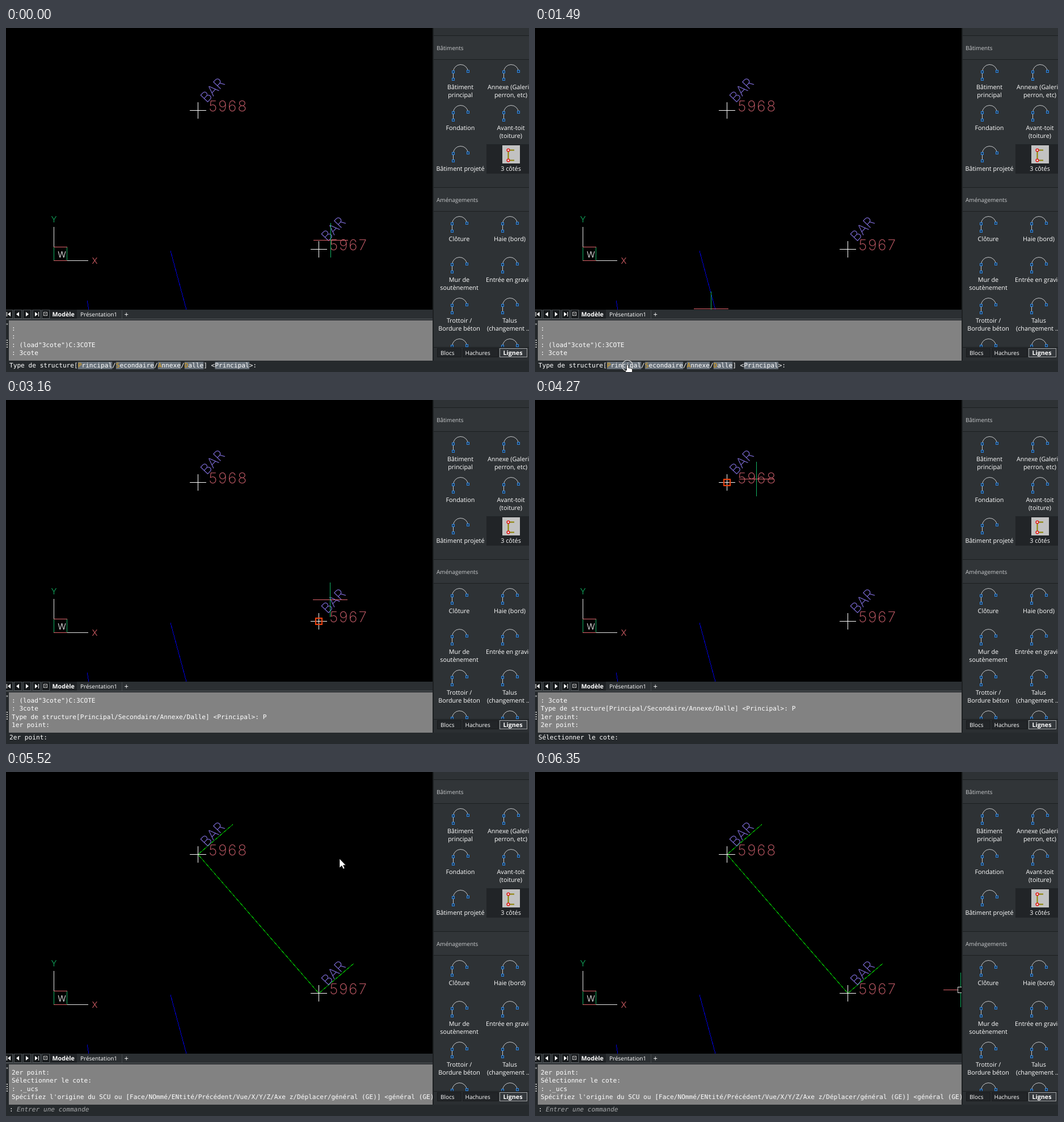
An HTML page for the animation above (6.87 s loop, 922x607 px).

```html
<!DOCTYPE html>
<html lang="fr">
<head>
<meta charset="utf-8">
<title>3 côtés</title>
<style>
html, body { margin: 0; width: 100%; height: 100%; overflow: hidden; background: #000; }
svg { display: block; width: 922px; height: 607px; }
text { white-space: pre; text-rendering: geometricPrecision; }
.mono { font: 11.15px "DejaVu Sans Mono", monospace; fill: #fff; }
.ui { font: 10px "Open Sans", "Noto Sans", sans-serif; fill: #fff; }
.label { font-size: 10.8px; text-anchor: middle; }
.left { text-anchor: start; }
.bold { font-weight: 700; font-size: 10.7px; }
.head { fill: #c8cacc; }
.plus { font-size: 13px; }
.tiny { font-size: 7px; }
.cad { font-family: Inter, Lato, sans-serif; font-weight: 200; }
.axis { font-weight: 300; font-size: 15px; text-anchor: middle; }
.crisp { shape-rendering: crispEdges; }
</style>
</head>
<body>
<svg id="stage" viewBox="0 0 922 607" xmlns="http://www.w3.org/2000/svg"></svg>
<script>
const LOOP = 6870;
const RED = '#e0646c', GREEN = '#12b464';
const CHAR = 6.713;

const rect = (x, y, w, h, fill, extra = '') =>
  `<rect x="${x}" y="${y}" width="${w}" height="${h}" fill="${fill}" ${extra}/>`;
const line = (x1, y1, x2, y2, stroke, extra = '') =>
  `<line x1="${x1}" y1="${y1}" x2="${x2}" y2="${y2}" stroke="${stroke}" ${extra}/>`;
const path = (d, fill, extra = '') => `<path d="${d}" fill="${fill}" ${extra}/>`;
const escape = s => s.replace(/&/g, '&amp;').replace(/</g, '&lt;');
const text = (x, y, s, cls, extra = '') =>
  `<text x="${x}" y="${y}" class="${cls}" ${extra}>${escape(s)}</text>`;

// ---- drawing area ----
function surveyPoint(x, y, id) {
  return line(x - 14, y + .5, x + 15, y + .5, '#fff', 'class="crisp"') +
    line(x + .5, y - 14, x + .5, y + 15, '#fff', 'class="crisp"') +
    text(x + 19.5, y + 1.5, id, 'cad', 'font-size="26" letter-spacing="2" fill="#c45c68"') +
    `<g transform="translate(${x + 26} ${y - 35.5}) rotate(-46)">` +
    text(0, 9, 'BAR', 'cad', 'font-size="25" text-anchor="middle" fill="#8472e2"') + '</g>';
}

function axes() {
  return '<g class="crisp">' +
    line(84.5, 351, 84.5, 387, '#e8e8e8') + line(108, 410.5, 145, 410.5, '#e8e8e8') +
    line(84.5, 387, 84.5, 410, GREEN) + line(107.5, 387, 107.5, 410, GREEN) +
    line(84, 386.5, 108, 386.5, RED) + line(84, 410.5, 108, 410.5, RED) + '</g>' +
    text(84.5, 343, 'Y', 'cad axis', `fill="${GREEN}"`) +
    text(156.5, 416, 'X', 'cad axis', `fill="${RED}"`) +
    text(98.5, 404.5, 'W', 'cad axis', 'fill="#fff"');
}

const snapMark = (id, x, y) =>
  rect(x - 5, y - 5, 11, 11, 'none', `id="${id}" stroke="#f0420f" stroke-width="2"`);

function drawing() {
  return `<g clip-path="url(#canvas)">` +
    path('M290 393L318 497M143 481L146 497', 'none', 'class="crisp" stroke="#0000d8"') + axes() +
    path('M400 92.5L338.5 145.5L551.5 390.5L613.5 337.5', 'none',
      'id="walls" class="crisp" stroke="#00c000"') +
    surveyPoint(338, 145, '5968') + surveyPoint(551, 390, '5967') +
    snapMark('snapA', 551, 390) + snapMark('snapB', 338, 145) +
    '<g id="cross" class="crisp">' + line(-30, .5, 31, .5, RED) + line(.5, -30, .5, 31, GREEN) +
    rect(-4.5, -4.5, 10, 10, '#000', 'id="pick" stroke="#ddd"') + '</g></g>';
}

// ---- sheet tabs, history and command line ----
function sheetTabs() {
  const buttons = [-2, 14, 30, 47, 63].map(x =>
    rect(x + .5, 497.5, 13, 15, '#16191b', 'stroke="#4a4f53"')).join('');
  return rect(0, 497, 753, 19, '#2b2f32') + buttons +
    path('M1.500 501v8M57.500 501v8', 'none', 'stroke="#fff"') +
    path('M8 501v8l-5-4zM23 501v8l-5-4zM35 501v8l5-4zM51 501v8l5-4z', '#fff') +
    rect(66.5, 501.5, 6, 6, 'none', 'stroke="#ccc"') + line(68, 504.5, 71, 504.5, '#ccc') +
    rect(78, 497, 47, 16, '#1f2225') +
    text(81.5, 509, 'Modèle', 'ui bold') + text(131, 509, 'Présentation1', 'ui') +
    text(208.5, 510, '+', 'ui plus') +
    line(204.5, 498, 204.5, 513, '#45494d') + line(0, 513.5, 753, 513.5, '#55595c');
}

function choicePrompt() {
  const s = 'Type de structure[Principal/Secondaire/Annexe/Dalle] <Principal>:';
  const at = i => 6 + i * CHAR;
  const links = [[18, 9], [28, 10], [39, 6], [46, 5], [54, 9]];
  const boxes = links.map(([i, n]) => rect(at(i), 589, n * CHAR, 13, '#68717a')).join('');
  const hot = links.slice(0, 4).map(l => l[0]);
  const spans = [...s].map((c, i) =>
    hot.includes(i) ? `<tspan fill="#e0a21c">${c}</tspan>` : escape(c)).join('');
  return `<g id="choice">${boxes}<text x="6" y="599" class="mono">${spans}</text></g>`;
}

function commandArea() {
  const rows = [0, 1, 2, 3].map(i =>
    `<text id="row${i}" x="10" y="${534 + i * 14.33}" class="mono"></text>`).join('');
  return sheetTabs() + rect(0, 516, 753, 71, '#24282b') + rect(5, 516, 748, 71, '#828282') +
    text(0, 525, '×', 'ui tiny') +
    [550, 554, 558, 562].map(y => rect(1, y, 2, 2, '#c8c8c8')).join('') + rows +
    rect(0, 587, 922, 20, '#262a2d') + choicePrompt() +
    '<text id="prompt" x="6" y="599" class="mono"></text>' +
    `<g id="idle">${text(6, 599, ':', 'mono')}` +
    text(19, 599, 'Entrer une commande', 'mono', 'font-style="italic" style="font-style:italic;fill:#a6a8aa"') + '</g>';
}

// ---- tool panel ----
function arcIcon(cx, y) {
  const knot = (x, v) => rect(x - 2, v - 2, 4, 4, '#1c3a58', 'stroke="#2f86e0"');
  const x = cx - 12.5;
  return path(`M${x} ${y + 26}V${y + 13}A13 13 0 0 1 ${x + 26} ${y + 12}`, 'none', 'stroke="#c4c6c8"') +
    knot(x, y + 12.5) + knot(x, y + 25.5) + knot(x + 26, y + 11.5);
}

// With `left`, the first long line starts there and runs off the stage.
function tool(cx, y, lines, left) {
  return arcIcon(cx, y) + lines.map((s, i) => {
    const cut = left && s.length > 13;
    return text(cut ? left : cx, y + 43 + i * 14.4, s, 'ui label' + (cut ? ' left' : ''));
  }).join('');
}

function sideHeader(y, s) {
  return rect(754, y, 168, 41, '#313538') + line(754, y - .5, 922, y - .5, '#1c1f21') +
    line(754, y + 41.5, 922, y + 41.5, '#1c1f21') + text(759, y + 24.5, s, 'ui head');
}

function panel() {
  const ends = [215.5, 233.5].map(y =>
    `<circle cx="885.5" cy="${y}" r="2.3" fill="#eee" stroke="#e01818" stroke-width="1.6"/>`).join('');
  const bracket = rect(847, 205, 75, 52, '#212427') + rect(875, 207, 31, 32, '#c2c2c2') +
    path('M896 215.500H885.500V233.500H896', 'none', 'stroke="#8c8200" stroke-width="2"') +
    ends + text(890, 252, '3 côtés', 'ui label');
  return rect(752, 0, 170, 587, '#2e3235') + line(753, 0, 753, 587, '#1d2022', 'stroke-width="2"') +
    sideHeader(14, 'Bâtiments') + sideHeader(282, 'Aménagements') +
    '<g clip-path="url(#list)">' + rect(0, 0, 0, 66, '#212427', 'id="hover"') +
    tool(801, 65, ['Bâtiment', 'principal']) +
    tool(890, 65, ['Annexe (Galerie,', 'perron, etc)'], 849) +
    tool(801, 137, ['Fondation']) + tool(890, 137, ['Avant-toit', '(toiture)']) +
    tool(801, 209, ['Bâtiment projeté']) + bracket +
    tool(799, 333, ['Clôture']) + tool(888, 333, ['Haie (bord)']) +
    tool(799, 405, ['Mur de', 'soutènement']) + tool(888, 405, ['Entrée en gravier'], 846) +
    tool(799, 477, ['Trottoir /', 'Bordure béton']) +
    tool(888, 477, ['Talus', '(changement ...'], 848) +
    tool(799, 549, []) + tool(888, 549, []) + '</g>' +
    rect(754, 563, 168, 24, '#2b2f32') + line(754, 563.5, 922, 563.5, '#1a1d1f') +
    rect(760.5, 565.5, 42, 15, '#222528', 'stroke="#191b1d"') +
    rect(805.5, 565.5, 62, 15, '#222528', 'stroke="#191b1d"') +
    rect(870.5, 565.5, 48, 15, '#34383c', 'stroke="#a0a2a4"') +
    text(766, 576.5, 'Blocs', 'ui') + text(809.5, 576.5, 'Hachures', 'ui') +
    text(876.5, 576.5, 'Lignes', 'ui bold');
}

function pointers() {
  return '<g id="pointer">' +
    path('M0 0V16L4 12.500L6.500 18L9 17L6.500 11.500H11Z', '#fff', 'id="arrow" stroke="#000" stroke-width=".6"') +
    path('M-3 -7.500H3M-3 7.500H3M0 -7.500V7.500', 'none', 'id="beam" stroke="#f4f4f4"') +
    '<g id="hand"><circle id="click" cx="0" cy="2" r="9.5" fill="none" stroke="#d8d8d8" stroke-width="1.2"/>' +
    path('M-1.500 1Q0 -1 1.500 1V6Q3 5 4 6.500Q5.500 5.500 6.500 7Q8.500 6.500 8.500 8.500V12L7 17H0L-4 11Q-4 9 -1.500 10Z', '#fff', 'stroke="#111" stroke-width=".8"') +
    '</g></g>';
}

const stage = document.getElementById('stage');
stage.innerHTML =
  '<defs><clipPath id="canvas"><rect width="752" height="497"/></clipPath>' +
  '<clipPath id="list"><rect x="754" width="168" height="563"/></clipPath></defs>' +
  rect(0, 0, 922, 607, '#000') + drawing() + commandArea() + panel() + pointers();

// ---- timeline ----
const history = [
  ':', ':', ': (load"3cote")C:3COTE', ': 3cote',
  'Type de structure[Principal/Secondaire/Annexe/Dalle] <Principal>: P',
  '1er point:', '2er point:', 'Sélectionner le cote:', ': ._ucs',
  "Spécifiez l'origine du SCU ou [Face/NOmmé/ENtité/Précédent/Vue/X/Y/Z/Axe z/Déplacer/général (GE)] <général (GE)>:"
];
// time, first visible history line, prompt
const steps = [
  [0, 0, ''], [1580, 1, '1er point:'], [3130, 2, '2er point:'],
  [4270, 3, 'Sélectionner le cote:'], [5130, 6, '']
];
// time, x, y of the mouse
const track = [
  [0, 572, 374], [700, 187, 557], [1180, 163, 594], [1750, 163, 593],
  [2440, 486, 384], [2500, 506, 373], [2820, 571, 352], [3290, 571, 352],
  [3770, 390, 139], [4500, 390, 139], [4860, 589, 154], [5490, 589, 154],
  [5520, 588, 153], [5550, 587, 161], [5850, 750, 384], [6180, 868, 560],
  [6350, 926, 626], [LOOP, 926, 626]
];

const slope = (i, k) => (track[i + 1][k] - track[i][k]) / (track[i + 1][0] - track[i][0]);

// Monotone tangent: the mouse never overshoots a point of the track.
function tangent(i, k) {
  if (i === 0 || i === track.length - 1) return 0;
  const a = slope(i - 1, k), b = slope(i, k);
  return a * b > 0 ? 2 * a * b / (a + b) : 0;
}

function mouseAt(t) {
  let i = 0;
  while (i < track.length - 2 && t >= track[i + 1][0]) i++;
  const span = track[i + 1][0] - track[i][0], u = (t - track[i][0]) / span;
  const v = 1 - u;
  return [1, 2].map(k =>
    (1 + 2 * u) * v * v * track[i][k] + u * v * v * span * tangent(i, k) +
    u * u * (3 - 2 * u) * track[i + 1][k] - u * u * v * span * tangent(i + 1, k));
}

const el = {};
stage.querySelectorAll('[id]').forEach(e => el[e.id] = e);
const show = (e, on) => e.setAttribute('display', on ? 'inline' : 'none');
const move = (e, x, y) => e.setAttribute('transform', `translate(${Math.round(x)} ${Math.round(y)})`);

function hoverCell(x, y) {
  const on = x > 756 && y > 329 && y < 563;
  show(el.hover, on);
  if (!on) return;
  const right = x >= 845;
  el.hover.setAttribute('x', right ? 845 : 756);
  el.hover.setAttribute('width', right ? 77 : 87);
  el.hover.setAttribute('y', 329 + 72 * Math.floor((y - 329) / 72));
}

function render(t) {
  const [, first, prompt] = steps.filter(s => t >= s[0]).pop();
  for (let i = 0; i < 4; i++) el['row' + i].textContent = history[first + i];
  el.prompt.textContent = prompt;
  show(el.choice, t < 1580);
  show(el.idle, t >= 5130);
  show(el.walls, t >= 5160);
  show(el.snapA, t >= 2740 && t < 3340);
  show(el.snapB, t >= 3720 && t < 4550);

  const [x, y] = mouseAt(t);
  const inside = x < 751 && y < 497;
  const waiting = t >= 5180 && t < 5550;
  const parked = t < 1580 ? [310, 495] : [750, 384];
  show(el.cross, inside ? !waiting : t < 1580 || t > 5550);
  move(el.cross, ...(inside ? [x, y] : parked));
  show(el.pick, t >= 5550);

  const typing = !inside && x < 752 && y > 516;
  const linked = typing && y > 588 && t < 1580;
  move(el.pointer, x, y);
  show(el.arrow, inside ? waiting : !typing);
  show(el.beam, typing && !linked);
  show(el.hand, linked);
  show(el.click, t >= 1490);
  hoverCell(x, y);
}

const begin = performance.now();
function tick() {
  render((performance.now() - begin) % LOOP);
  requestAnimationFrame(tick);
}
render(0);
requestAnimationFrame(tick);
</script>
</body>
</html>
```
